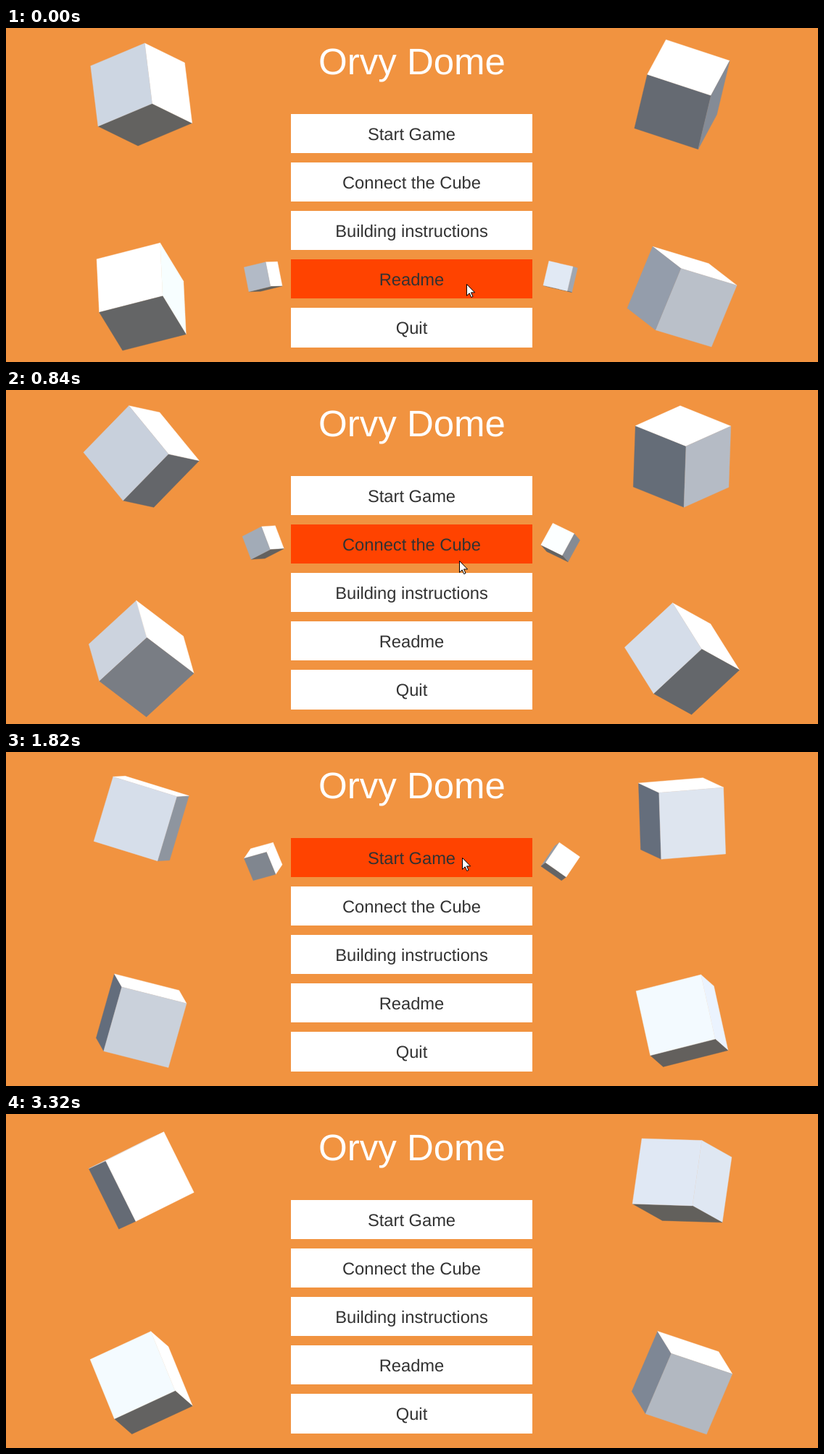
An HTML page for the animation above (3.42 s loop, 1120x462 px).

```html
<!DOCTYPE html>
<html lang="en">
<head>
<meta charset="utf-8">
<title>Cube menu</title>
<style>
  html, body { margin: 0; width: 100%; height: 100%; overflow: hidden; background: #f19340; }
  svg { display: block; width: 1120px; height: 462px; }
  text { font: 23.7px "Liberation Sans", Arial, sans-serif; text-anchor: middle; fill: #323232; text-rendering: geometricPrecision; }
  rect { shape-rendering: crispEdges; }
  .title { font-size: 51px; fill: #fff; }
</style>
</head>
<body>
<svg viewBox="0 0 1120 462">
  <text class="title" x="560" y="64">Orvy Dome</text>
  <g id="menu"></g>
  <g id="cubes" stroke-width=".4" stroke-linejoin="round"></g>
  <path id="cursor" d="M.5.5v15.8l3.7-3.5 2.5 5.7 2.3-1-2.5-5.6h5.1z" fill="#fff" stroke="#000"/>
</svg>
<script>
const LOOP = 3420, FACING_TIME = 2380;
const MENU = { left: 393, top: 119, width: 333, height: 54.12, pitch: 67.1 };
const ITEMS = [
  { label: 'Start Game', cubeY: 151.5 },
  { label: 'Connect the Cube', cubeY: 211 },
  { label: 'Building instructions', cubeY: 278 },
  { label: 'Readme', cubeY: 344 },
  { label: 'Quit', cubeY: 411 }
];
const LIGHT = [0.321, -0.766, -0.557];

// Large cubes all face the viewer at FACING_TIME and spin steadily, each about its own axis.
const LARGE = [
  { x: 186.7, y: 92, axis: [-0.104, -0.513, -0.852] },
  { x: 932.5, y: 92, axis: [-0.444, 0.882, 0.163] },
  { x: 186.7, y: 371.7, axis: [-0.522, 0.395, -0.756] },
  { x: 932.5, y: 371.7, axis: [0.553, -0.498, 0.668] }
];

// Key points: time in ms, then a rotation vector in degrees or a position.
const SMALL = [
  { x: 354.7, turn: [[0, -2, 28, -12], [620, -7, 39, -28], [1120, -2, 26, -17], [2380, 38, 14, -20]] },
  { x: 764.7, turn: [[0, -2, 11, 13], [620, -11, 20, 28], [1120, -13, 13, 26], [2380, -10, -25, 41]] }
];
const POINTER = [[0, 635, 354], [620, 625, 278], [1120, 626, 183], [1300, 628, 148],
  [2430, 631, 144], [2660, 1020, 300], [3000, 1041, 470]];

const $ = id => document.getElementById(id);
const dot = (a, b) => a[0] * b[0] + a[1] * b[1] + a[2] * b[2];

// Linear between key points; the last stretch carries on.
function sample(keys, t) {
  const next = keys.findIndex(key => key[0] > t);
  const i = next < 0 ? keys.length - 1 : next;
  const [t0, ...from] = keys[i - 1], [t1, ...to] = keys[i];
  return from.map((v, j) => v + (to[j] - v) * (t - t0) / (t1 - t0));
}

// The three cube axes after a turn; x right, y down, z away from the viewer.
function turnedAxes(vector) {
  const degrees = Math.hypot(...vector);
  const [x, y, z] = vector.map(v => v / (degrees || 1));
  const s = Math.sin(degrees * Math.PI / 180), c = Math.cos(degrees * Math.PI / 180), k = 1 - c;
  return [
    [x * x * k + c, x * y * k + z * s, x * z * k - y * s],
    [x * y * k - z * s, y * y * k + c, y * z * k + x * s],
    [x * z * k + y * s, y * z * k - x * s, z * z * k + c]
  ];
}

// One sun plus a bluish sky that fades to neutral grey on downward faces.
function shade(n) {
  const lit = Math.max(0, dot(n, LIGHT));
  const level = 110 - 15 * n[1] ** 2 + 232 * lit;
  const tint = 12 - 11 * n[1] ** 2 - 5 * lit - 5 * n[1];
  return `rgb(${[level - 0.8 * tint, level, level + 1.2 * tint].map(v => Math.min(255, Math.round(v)))})`;
}

function cube(x, y, size, vector) {
  const axes = turnedAxes(vector);
  return axes.map((axis, i) => {
    const n = axis.map(v => axis[2] > 0 ? -v : v);
    const u = axes[(i + 1) % 3], v = axes[(i + 2) % 3];
    const points = [[-1, -1], [1, -1], [1, 1], [-1, 1]].map(([a, b]) =>
      [x, y].map((o, j) => (o + size / 2 * (n[j] + a * u[j] + b * v[j])).toFixed(2)));
    const color = shade(n);
    return `<polygon points="${points.join(' ')}" fill="${color}" stroke="${color}"/>`;
  }).join('');
}

function hoveredItem(x, y) {
  const offset = y + 4 - MENU.top, row = Math.floor(offset / MENU.pitch);
  const inside = x >= MENU.left && x < MENU.left + MENU.width && offset - row * MENU.pitch < MENU.height;
  return inside ? ITEMS[row] : undefined;
}

$('menu').innerHTML = ITEMS.map(({ label }, i) => {
  const y = MENU.top + i * MENU.pitch;
  return `<rect x="${MENU.left}" y="${y}" width="${MENU.width}" height="${MENU.height}"/>
    <text x="559.5" y="${Math.round(y) + 36}">${label}</text>`;
}).join('');
const buttons = document.querySelectorAll('#menu rect');

function draw(t) {
  const [x, y] = sample(POINTER, t);
  const active = hoveredItem(x, y);
  const angle = (t - FACING_TIME) * (t < FACING_TIME ? 0.0354 : 0.0328);
  buttons.forEach((button, i) => button.setAttribute('fill', ITEMS[i] === active ? '#ff4300' : '#fff'));
  const shapes = LARGE.map(c => cube(c.x, c.y, 93.3, c.axis.map(v => v * angle)));
  if (active) shapes.push(...SMALL.map(c => cube(c.x, active.cubeY, 34.6, sample(c.turn, t))));
  $('cubes').innerHTML = shapes.join('');
  $('cursor').setAttribute('transform', `translate(${Math.round(x)} ${Math.round(y)})`);
}

let start;
function tick(now) {
  start ??= now;
  // The last pose rests for 100 ms before the loop restarts.
  draw(Math.min((now - start) % LOOP, LOOP - 100));
  requestAnimationFrame(tick);
}
draw(0);
requestAnimationFrame(tick);
</script>
</body>
</html>
```
